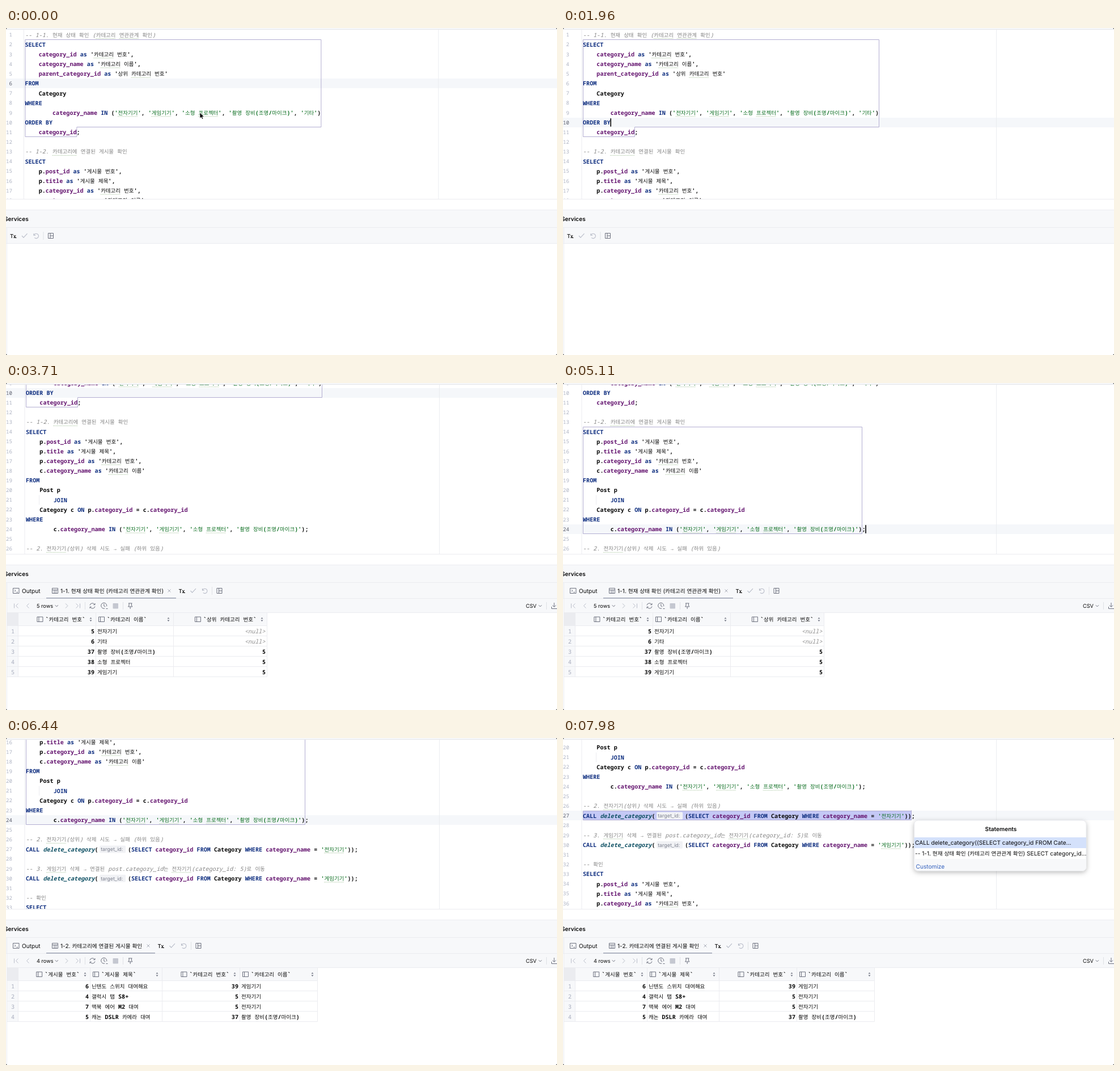
Animation of 972 by 576 pixels, one loop 8000 ms. Source, as an HTML page:

```html
<!DOCTYPE html>
<html lang="ko">
<head>
<meta charset="utf-8">
<title>SQL console</title>
<style>
html, body { margin: 0; width: 100%; height: 100%; overflow: hidden; background: #fff; }
svg { display: block; width: 972px; height: 576px; }
text { font-size: 10.133px; font-family: Inter, "Noto Sans CJK KR", "Noto Sans CJK JP", sans-serif; white-space: pre; text-rendering: geometricPrecision; }
.mono { font-family: "Noto Sans Mono", "DejaVu Sans Mono", monospace; font-weight: 600; }
.ko { font-family: "Noto Sans CJK KR", "Noto Sans CJK JP", "Noto Sans CJK", sans-serif; font-size: 9.48px; font-weight: 500; font-style: normal; }
.ui .ko { font-size: 9.65px; }
.num { font-size: 9.1px; font-weight: 400; }
</style>
</head>
<body>
<script>
const LOOP = 8000, STEP = 70;
const PITCH = 17.15, LEFT = 35, CHAR = 6.08, HANGUL = 8.72, HINT = 52.3;
const EDGE = '#ebecf0', PANEL = '#f7f8fa', DARK = '#080808', GRAY = '#6c707e', FAINT = '#b9bdc9';
const NS = 'http://www.w3.org/2000/svg';

const code = `-- 1-1. 현재 상태 확인 (카테고리 연관관계 확인)
SELECT
    category_id as '카테고리 번호',
    category_name as '카테고리 이름',
    parent_category_id as '상위 카테고리 번호'
FROM
    Category
WHERE
        category_name IN ('전자기기', '게임기기', '소형 프로젝터', '촬영 장비(조명/마이크)', '기타')
ORDER BY
    category_id;

-- 1-2. 카테고리에 연결된 게시물 확인
SELECT
    p.post_id as '게시물 번호',
    p.title as '게시물 제목',
    p.category_id as '카테고리 번호',
    c.category_name as '카테고리 이름'
FROM
    Post p
        JOIN
    Category c ON p.category_id = c.category_id
WHERE
        c.category_name IN ('전자기기', '게임기기', '소형 프로젝터', '촬영 장비(조명/마이크)');

-- 2. 전자기기(상위) 삭제 시도 → 실패 (하위 있음)
CALL delete_category(¤(SELECT category_id FROM Category WHERE category_name = '전자기기'));

-- 3. 게임기기 삭제 → 연결된 post.category_id는 전자기기(category_id: 5)로 이동
CALL delete_category(¤(SELECT category_id FROM Category WHERE category_name = '게임기기'));

-- 확인
SELECT
    p.post_id as '게시물 번호',
    p.title as '게시물 제목',
    p.category_id as '카테고리 번호',`.split('\n');

function add(parent, tag, attrs = {}, text) {
  const el = document.createElementNS(NS, tag);
  for (const key in attrs) el.setAttribute(key, attrs[key]);
  if (text !== undefined) el.textContent = text;
  parent.append(el);
  return el;
}
const group = (parent, attrs) => add(parent, 'g', attrs);
const rect = (parent, x, y, width, height, fill, more) => add(parent, 'rect', { x, y, width, height, fill, ...more });
const stroke = (parent, d, color = GRAY, width = 1, more) =>
  add(parent, 'path', { d, fill: 'none', stroke: color, 'stroke-width': width, ...more });
const show = (el, on) => el.setAttribute('visibility', on ? 'visible' : 'hidden');
const lineY = n => 12 + (n - 1) * PITCH;
const crisp = v => Math.floor(v) + .5;
const isKo = s => /[가-힣]/.test(s);
const advance = s => [...s].reduce((w, c) => w + (c === '¤' ? HINT : isKo(c) ? HANGUL : CHAR), 0);

// Monospaced text, set run by run; y is the middle of the line
function mono(parent, x, y, s, { fill = DARK, italic = false, typos = false, weight } = {}) {
  for (const run of s.match(/[가-힣]+|[^가-힣\s]+|\s+/g) || []) {
    const width = advance(run);
    if (run.trim()) add(parent, 'text', { x, y: y + 3.6, fill, class: isKo(run) ? 'ko' : 'mono',
      ...(italic && { 'font-style': 'italic' }), ...(weight && { style: `font-weight:${weight}` }) }, run);
    if (typos && isKo(run) && run.length > 3)
      stroke(parent, `M${x - .5} ${y + 6.6}h${width}`, '#a9c6a0', .8, { 'stroke-dasharray': '1.6 .8' });
    x += width;
  }
  return x;
}
const monoEnd = (parent, x, y, s, options) => mono(parent, x - advance(s), y, s, options);

function label(parent, x, y, s, attrs = {}) {
  const el = add(parent, 'text', { x, y: y + 3.6, fill: DARK, class: 'ui', ...attrs });
  for (const run of s.match(/[가-힣]+|[^가-힣]+/g)) add(el, 'tspan', isKo(run) ? { class: 'ko' } : {}, run);
}

function tokenStyle(token, line) {
  if (token[0] === "'") return { fill: line.includes(' as ') ? DARK : '#0d6f22', typos: true };
  if (/^(SELECT|FROM|WHERE|ORDER|BY|IN|as|JOIN|ON|CALL)$/.test(token)) return { fill: '#0f2f80' };
  if (token === 'delete_category') return { fill: '#0d4f63', italic: true };
  return { fill: /_|^title$/.test(token) ? '#64146f' : DARK };
}
function codeLine(parent, line, y) {
  if (line.startsWith('--'))
    return mono(parent, LEFT, y, line, { fill: '#858585', italic: true, typos: true, weight: 400 });
  let x = LEFT;
  for (const token of line.match(/'[^']*'|\w+|\s+|./g) || []) {
    if (token === '¤') {
      rect(parent, x + 2.5, y - 6.5, 46, 13, '#f1f2f5', { rx: 2 });
      label(parent, x + 4.5, y - .4, 'target_id:', { fill: '#7d818f', style: 'font-size:8.9px' });
      x += HINT;
    } else x = mono(parent, x, y, token, tokenStyle(token, line));
  }
}

const svg = add(document.body, 'svg', { viewBox: '0 0 972 576' });
const defs = add(svg, 'defs');
rect(add(defs, 'clipPath', { id: 'editor' }), 0, 3, 972, 298.5);
add(add(defs, 'filter', { id: 'shadow', x: '-10%', y: '-25%', width: '120%', height: '160%' }),
  'feDropShadow', { dx: 0, dy: 2.5, stdDeviation: 4, 'flood-opacity': .28 });

// Editor
const editor = group(svg, { 'clip-path': 'url(#editor)' });
const currentRow = rect(editor, 0, 0, 972, 17, '#f5f7fa');
const shifted = group(editor);
stroke(shifted, 'M33 0V302M764.5 0V302', EDGE);
const numbers = group(editor);
const codeLayer = group(shifted);

function outline(first, last, right, lastRight = right) {
  const top = crisp(lineY(first) - 8.6), bottom = crisp(lineY(last) + 7.8), fold = bottom - 17;
  return stroke(codeLayer, `M35.5 ${top}H${right}V${fold}H${lastRight}V${bottom}H35.5Z`, '#b3aed2');
}
const statements = [outline(2, 11, 557.5, 126.5), outline(14, 24, 527.5), outline(27, 27, 614.5)];
stroke(codeLayer, `M58.5 ${lineY(21) - 8.5}v17`, EDGE);
const numberEls = code.map((line, i) => {
  codeLine(codeLayer, line, lineY(i + 1));
  return add(numbers, 'text', { x: 11, y: lineY(i + 1) + 3.3, 'text-anchor': 'end', class: 'mono num' }, i + 1);
});
const checks = [2, 14].map(n => {
  const g = group(numbers);
  rect(g, 5, lineY(n) - 5, 9, 10, '#fff');
  stroke(g, `M4 ${lineY(n)}l3 3.4l7-7`, '#55a76a', 1.6);
  return g;
});
const caret = rect(codeLayer, 0, 0, 1.6, 14.5, '#000');

// Window frame and services panel
rect(svg, 0, 0, 972, 2, PANEL);
stroke(svg, 'M0 2.5H972', '#e3e5e9');
rect(svg, 0, 320, 972, 59, PANEL);
stroke(svg, 'M0 301.5H972M0 320.5H972M0 351.5H972M0 379.5H972M1.5 352V576', EDGE);
label(svg, -3, 336.5, 'Services', { 'font-weight': 600 });

function sessionTools(parent, dx) {
  const g = group(parent, { transform: `translate(${dx})` });
  label(g, 7, 366, 'Tx', { style: 'font-size:9.4px', 'font-weight': 500 });
  stroke(g, 'M15 369.5h3.5', DARK);
  stroke(g, 'M28 366l3 3.2l6.5-7', FAINT, 1.1);
  stroke(g, 'M49 362v3.3h3.3M49.3 365a4.2 4.2 0 1 1 1 4.4', FAINT, 1.1);
  stroke(g, 'M66 359v14', '#dfe1e5');
  stroke(g, 'M74.5 361.5h9v9h-9zM78 361.5v9M78 366h5.5', GRAY);
}
const idle = group(svg);
sessionTools(idle, 0);

function tableIcon(g, x, y) {
  stroke(g, `M${x} ${y - 4}h10v8.5h-10zM${x + 3} ${y - 4}v8.5`, GRAY);
}

function resultPanel({ title, tabEnd, rows, edges, heads, numeric }) {
  const all = group(svg), tab = group(all), grid = group(all), count = group(all);
  rect(tab, 2, 380, 970, 24, PANEL);
  stroke(tab, 'M12.5 361.5h10.5v9h-10.5zM15 364l2 1.8l-2 1.8M18.5 368.5h2.5', GRAY);
  label(tab, 28, 366, 'Output');
  stroke(tab, 'M81.5 361.5h10v9h-10zM81.5 364.5h10M85 364.5v6M88.2 364.5v6', GRAY);
  label(tab, 96, 366, title);
  stroke(tab, `M${tabEnd - 14.5} 363.5l5 5m0-5l-5 5`, '#a0a4b0', .9);
  rect(tab, 71, 378, tabEnd - 71, 1.7, '#a5abbb');
  sessionTools(tab, tabEnd - 2.5);
  stroke(tab, 'M14.5 388.5v8M21.5 388.5l-4 4l4 4M40.5 388.5l-4 4l4 4M105 388.5l4 4l-4 4M123.5 388.5l4 4l-4 4M130.5 388.5v8', FAINT);
  stroke(tab, 'M139.5 386v13M206.5 386v13M953.5 386v13', '#dfe1e5');
  stroke(tab, 'M148 391.5a4.5 4.5 0 0 1 8.3-1.4M157 393.5a4.5 4.5 0 0 1-8.3 1.4M157 388v2.6h-2.7M148 397v-2.6h2.7', GRAY);
  stroke(tab, 'M177.6 393.3a5 5 0 1 0-3.4 3.7M172.8 389v3.8l2.5 1.2M176.5 397.5h3', GRAY);
  rect(tab, 188.5, 388, 9.5, 9.5, '#c4c7d0', { rx: 1 });
  stroke(tab, 'M216 388h6.5M217 388v4l-1.5 2h7.5l-1.5-2v-4M219.2 394v4', GRAY);
  stroke(tab, 'M962.5 394v3.5h11M967 387v7.5M964 391.5l3 3l3-3', GRAY);
  stroke(tab, 'M1 404.5H972', EDGE);
  const small = { style: 'font-size:9.2px' };
  label(count, 54, 392.3, rows.length + ' rows', small);
  label(count, 917, 392.3, 'CSV', small);
  stroke(count, 'M86.8 391.3l2.6 2.6l2.6-2.6M939.8 391.3l2.6 2.6l2.6-2.6', GRAY);

  const right = edges.at(-1), rowY = i => 436.5 + i * 18, bottom = rowY(rows.length - 1) + 9;
  rect(grid, 2, 405, right - 2, 23, PANEL);
  rect(grid, 2, 405, 19, 22, EDGE);
  rect(grid, 2, 428, 19, bottom - 428, PANEL);
  stroke(grid, edges.map(x => `M${x} 405V${bottom}`).join('') + `M2 427.5H${right}`, EDGE);
  heads.forEach((head, i) => {
    const text = '`' + head + '`', end = edges[i + 1];
    const x = numeric[i] ? end - 18.5 - advance(text) : edges[i] + 19.5;
    tableIcon(grid, x - 14.5, 416);
    mono(grid, x, 416.5, text);
    add(grid, 'path', { d: `M${end - 11} 415.3l2-2.4l2 2.4zM${end - 11} 417.5l2 2.4l2-2.4z`, fill: GRAY });
  });
  rows.forEach((row, r) => {
    const y = rowY(r);
    stroke(grid, `M2 ${y + 9}H${right}`, EDGE);
    mono(grid, 9, y + .4, String(r + 1), { fill: '#a8adbd', weight: 400 });
    row.split('|').forEach((cell, i) => {
      if (cell === '<null>') monoEnd(grid, edges[i + 1] - 3, y + .4, cell, { fill: '#8c8c8c', italic: true, weight: 400 });
      else if (numeric[i]) monoEnd(grid, edges[i + 1] - 2.5, y + .4, cell);
      else mono(grid, edges[i] + 2.5, y + .4, cell);
    });
  });
  return { tab, grid, count };
}
const categories = resultPanel({
  title: '1-1. 현재 상태 확인 (카테고리 연관관계 확인)', tabEnd: 300,
  edges: [21.5, 158.5, 295.5, 460.5], numeric: [1, 0, 1],
  heads: ['카테고리 번호', '카테고리 이름', '상위 카테고리 번호'],
  rows: ['5|전자기기|<null>', '6|기타|<null>', '37|촬영 장비(조명/마이크)|5', '38|소형 프로젝터|5', '39|게임기기|5']
});
const posts = resultPanel({
  title: '1-2. 카테고리에 연결된 게시물 확인', tabEnd: 263,
  edges: [21.5, 148.5, 275.5, 412.5, 549.5], numeric: [1, 0, 1, 0],
  heads: ['게시물 번호', '게시물 제목', '카테고리 번호', '카테고리 이름'],
  rows: ['6|닌텐도 스위치 대여해요|39|게임기기', '4|갤럭시 탭 S8+|5|전자기기',
    '7|맥북 에어 M2 대여|5|전자기기', '5|캐논 DSLR 카메라 대여|37|촬영 장비(조명/마이크)']
});
const spinner = stroke(svg, 'M535 484a8 8 0 1 1-8 8', '#a8adbd', 2);

// Statement chooser
function popup(x, y, first) {
  const g = group(svg, { transform: `translate(${x} ${y})` });
  rect(g, 0, 0, 303.5, 89, '#fff', { rx: 7, filter: 'url(#shadow)', stroke: '#d3d5dc', 'stroke-width': .5 });
  add(g, 'path', { d: 'M0 68H303.5V82a7 7 0 0 1-7 7H7a7 7 0 0 1-7-7Z', fill: PANEL });
  rect(g, 0, 30, 303.5, 19, '#d4e1fb');
  label(g, 153, 15.5, 'Statements', { 'text-anchor': 'middle', 'font-weight': 600 });
  label(g, 1.5, 39.7, first);
  label(g, 1.5, 58.3, '-- 1-1. 현재 상태 확인 (카테고리 연관관계 확인) SELECT category_id...');
  label(g, 3, 81, 'Customize', { fill: '#315fbd' });
  return g;
}
const popups = [
  popup(82, 175, "SELECT category_id as '카테고리 번호', category_n..."),
  popup(534, 266, "SELECT p.post_id as '게시물 번호', p.title as..."),
  popup(619.5, 145, 'CALL delete_category((SELECT category_id FROM Cate...')
];
const pointer = add(svg, 'path', { d: 'M0 0V10.2L2.4 8L4 11.6L5.8 10.8L4.2 7.3H7.4Z', fill: '#000', stroke: '#fff', 'stroke-width': .7 });
add(svg, 'path', { d: 'M0 0h2l-2 2zM972 0v2l-2-2zM0 576v-2l2 2zM972 576h-2l2-2z', fill: '#555' });

// Timeline
const scrollKeys = [[2800, 0], [2870, 12], [2940, 42], [3080, 99], [3220, 126], [3430, 142], [3710, 149],
  [6160, 149], [6300, 188], [6440, 262], [6580, 305], [6720, 321]];
const pointerKeys = [[0, 342, 149], [770, 75, 160], [3920, 75, 160], [4340, 566, 238], [4620, 537, 256],
  [6930, 537, 256], [7280, 636, 150], [7560, 621, 130]];
const pointerShown = [[0, 1260], [3990, 4970], [7000, 7910]];
const caretShown = [[1400, 1470], [1960, 2450], [2950, 3500], [4000, 4500], [4970, 5180], [5460, 6230], [7000, 7500], [7910, 7980]];
const popupShown = [[1470, 1960], [5180, 5460], [7980, LOOP]];
const statementShown = [[0, 4970], [5040, 7910], [7910, LOOP]];
const spinnerShown = [[2240, 2450], [5810, 5950]];

const within = (t, [from, to]) => t >= from && t < to;
const linear = p => p, smooth = p => (1 - Math.cos(Math.PI * p)) / 2;
function sample(keys, t, ease, col = 1) {
  const next = keys.findIndex(k => k[0] > t);
  if (next === 0) return keys[0][col];
  if (next < 0) return keys.at(-1)[col];
  const a = keys[next - 1], b = keys[next];
  return a[col] + (b[col] - a[col]) * ease((t - a[0]) / (b[0] - a[0]));
}

function draw(t) {
  const scroll = Math.round(sample(scrollKeys, t, linear));
  const row = t < 1400 ? 6 : t < 4970 ? 10 : t < 7910 ? 24 : 27;
  const move = `translate(0 ${-scroll})`;
  shifted.setAttribute('transform', `translate(${t < 1960 ? -1.6 : 0})`);
  codeLayer.setAttribute('transform', move);
  numbers.setAttribute('transform', move);
  currentRow.setAttribute('y', Math.round(lineY(row) - 8.6) - scroll);
  numberEls.forEach((el, i) => el.setAttribute('fill', i + 1 === row ? '#5a5d6b' : '#aeb3c2'));

  caret.setAttribute('x', LEFT + advance(code[row - 1]) - .2);
  caret.setAttribute('y', lineY(row) - 7.2);
  show(caret, caretShown.some(span => within(t, span)));
  statements.forEach((el, i) => {
    show(el, within(t, statementShown[i]));
    el.setAttribute('fill', within(t, popupShown[i]) ? '#c4c8f5' : 'none');
    show(popups[i], within(t, popupShown[i]));
  });
  show(checks[0], t >= 2030);
  show(checks[1], t >= 5530);

  const second = t >= 5530;
  show(idle, t < 2030);
  show(categories.tab, t >= 2030 && !second);
  show(categories.grid, t >= 2100 && !second);
  show(categories.count, t >= 2240 && !second);
  show(posts.tab, second);
  show(posts.grid, t >= 5600);
  show(posts.count, t >= 5950);
  show(spinner, spinnerShown.some(span => within(t, span)));
  spinner.setAttribute('transform', `rotate(${t * .45 % 360} 535 492)`);

  show(pointer, pointerShown.some(span => within(t, span)));
  pointer.setAttribute('transform', `translate(${sample(pointerKeys, t, smooth)} ${sample(pointerKeys, t, smooth, 2)})`);
}

const start = performance.now();
function tick() {
  const t = (performance.now() - start) % LOOP;
  draw(Math.floor(t / STEP) * STEP);
  requestAnimationFrame(tick);
}
tick();
</script>
</body>
</html>
```
